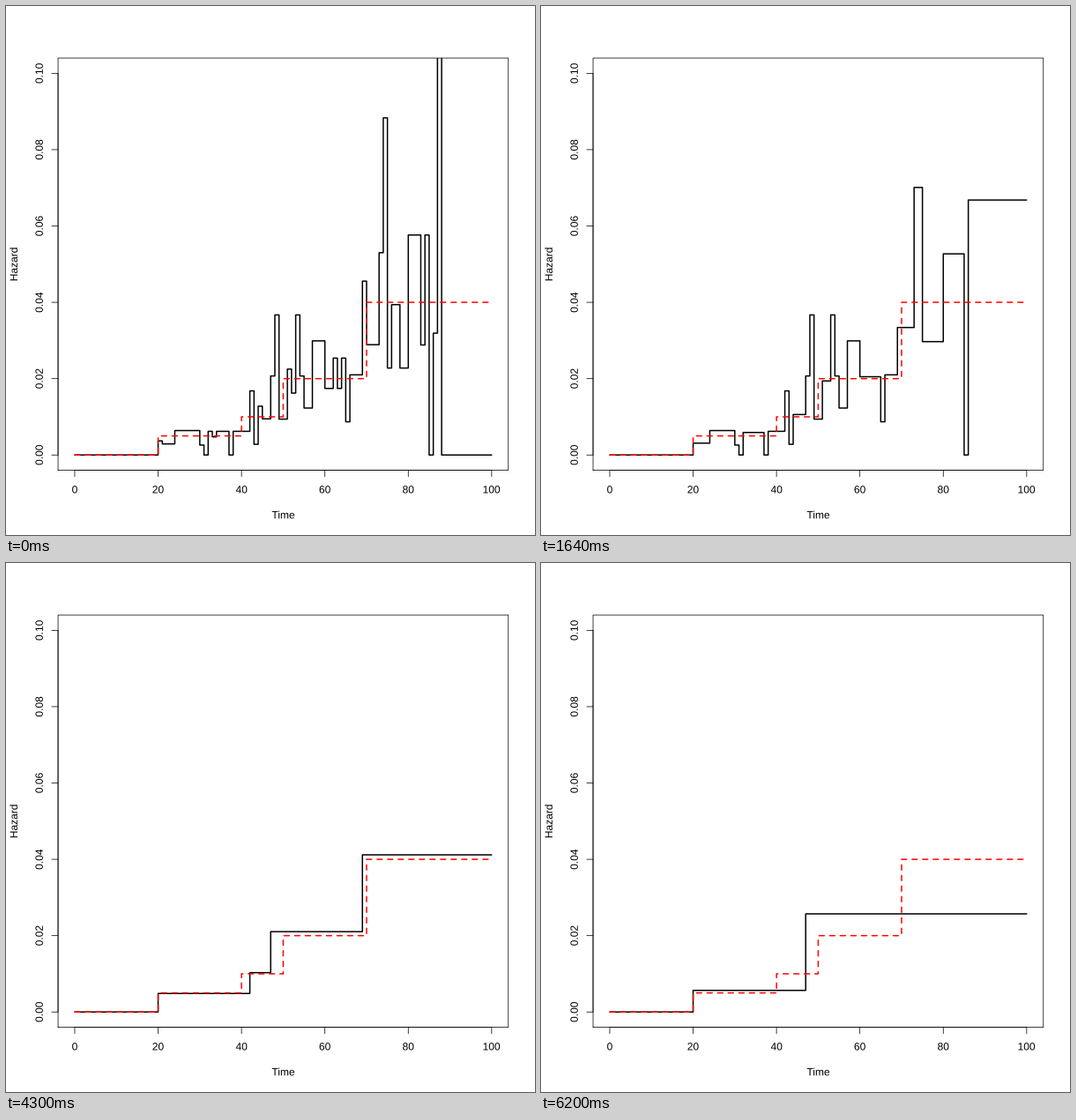
Write a matplotlib script that moves like this. It is 600x600 px and loops after 8 s.

```python
import math

import matplotlib.pyplot as plt
import numpy as np
from matplotlib.animation import FuncAnimation
from matplotlib.patches import PathPatch, Rectangle
from matplotlib.textpath import TextPath
from matplotlib.transforms import Affine2D

plt.rcParams.update({"font.family": "Liberation Sans", "path.simplify": False})

SIZE = 600
INTERVAL = 100
LOOP = 8000
LEFT, RIGHT, TOP, BOTTOM = 59.04, 569.76, 59.04, 526.56
LINE = 14.4  # height of one margin line
TICK = LINE / 2
END = 100

TRUE_HAZARD = {0: 0, 20: .005, 40: .01, 50: .02, 70: .04}
OBSERVED = {
    0: 0, 20: .0031, 24: .0064, 30: .0026, 31: 0, 32: .0059, 37: 0,
    38: .0062, 42: .0168, 43: .0028, 44: .0106, 47: .0207, 48: .0367,
    49: .0094, 51: .0194, 53: .0367, 54: .0207, 55: .0123, 57: .0299,
    60: .0205, 65: .0087, 66: .021, 69: .0334, 73: .0701, 75: .0297,
    80: .0527, 85: 0, 86: .0668,
}
EXTRA_CUTS = [21, 33, 34, 45, 52, 62, 63, 64, 70, 74, 76, 78, 83, 84, 87, 88]

# The group at risk shrinks steadily and is empty from year 88 on.
years = np.arange(END)
at_risk = np.where(years < 88, 89 - years, 0)


def spans(starts):
    starts = sorted(starts)
    return list(zip(starts, starts[1:] + [END]))


def pool(breaks):
    """Average the observed hazard between breaks, weighted by risk."""
    yearly = np.concatenate([[OBSERVED[a]] * (b - a)
                             for a, b in spans(OBSERVED)])
    return {a: np.average(yearly[a:b], weights=at_risk[a:b])
            for a, b in spans(breaks)}


def roughen(steps):
    """Split spans at the extra cuts into alternating highs and lows.

    The last part of a span contrasts with the next span, the swing grows
    as fewer are at risk, and the pooled hazard of the span is kept.
    """
    rough = {}
    for a, b in spans(steps):
        cuts = [c for c in EXTRA_CUTS if a < c < b]
        last = 1 if steps.get(b, math.inf) < steps[a] else -1
        cuts_left = np.array([sum(c > year for c in cuts)
                              for year in range(a, b)])
        swing = last * (-1) ** cuts_left / math.sqrt(at_risk[a])
        factor = (1 + swing) * (at_risk[a:b] > 0)
        factor = factor / np.average(factor, weights=at_risk[a:b])
        for start in [a] + cuts:
            rough[start] = steps[a] * factor[start - a]
    return rough


def px(time):
    return LEFT + (time + 4) * (RIGHT - LEFT) / 108


def py(hazard):
    return BOTTOM - (hazard + 0.004) * (BOTTOM - TOP) / 0.108


def staircase(steps):
    xs, ys = [], []
    for start, end in spans(steps):
        xs += [px(start), px(end)]
        ys += [py(steps[start])] * 2
    return xs, ys


STAGES = [
    (0, roughen(OBSERVED)),
    (500, OBSERVED),
    (2400, pool([0, 20, 42, 47, 49, 51, 69, 73, 75])),
    (4300, pool([0, 20, 42, 47, 69])),
    (6200, pool([0, 20, 47])),
]

fig = plt.figure(figsize=(SIZE / 72, SIZE / 72), dpi=72, facecolor="white")
ax = fig.add_axes([0, 0, 1, 1])
ax.set(xlim=(0, SIZE), ylim=(SIZE, 0))
ax.axis("off")


def stroke(xs, ys, **style):
    options = dict(color="black", lw=0.75, solid_capstyle="round",
                   solid_joinstyle="round", snap=False)
    return ax.plot(xs, ys, **{**options, **style})[0]


def label(x, y, text, angle=0):
    """Text centred on x, y along its baseline, at sub-pixel position."""
    path = TextPath((0, 0), text, size=12)
    box = path.get_extents()
    place = (Affine2D().translate(-(box.x0 + box.x1) / 2, 0).scale(1, -1)
             .rotate_deg(-angle).translate(x, y))
    ax.add_patch(PathPatch(path.transformed(place), color="black", lw=0,
                           snap=False))


estimate = stroke([], [], lw=1.5, zorder=1)
estimate.set_clip_path(
    Rectangle((LEFT, TOP), RIGHT - LEFT, BOTTOM - TOP,
              transform=ax.transData))

# Frame and axes
stroke([LEFT, RIGHT, RIGHT, LEFT, LEFT], [BOTTOM, BOTTOM, TOP, TOP, BOTTOM])
stroke([px(0), px(END)], [BOTTOM, BOTTOM])
stroke([LEFT, LEFT], [py(0), py(0.1)])
for i in range(6):
    x, y = px(20 * i), py(0.02 * i)
    stroke([x, x], [BOTTOM, BOTTOM + TICK])
    stroke([LEFT, LEFT - TICK], [y, y])
    label(x, BOTTOM + 1.8 * LINE, str(20 * i))
    label(LEFT - 1.2 * LINE, y, f"{0.02 * i:.2f}", 90)
label((LEFT + RIGHT) / 2, BOTTOM + 3.8 * LINE, "Time")
label(LEFT - 3.2 * LINE, (TOP + BOTTOM) / 2, "Hazard", 90)

stroke(*staircase(TRUE_HAZARD), color="red", lw=1.5, zorder=3,
       linestyle=(0, (4, 4)), dash_capstyle="round", dash_joinstyle="round")


def draw(frame):
    now = frame * INTERVAL
    steps = [s for start, s in STAGES if start <= now][-1]
    estimate.set_data(*staircase(steps))
    return [estimate]


anim = FuncAnimation(fig, draw, frames=LOOP // INTERVAL, interval=INTERVAL,
                     repeat=True, repeat_delay=0)
plt.show()
```
